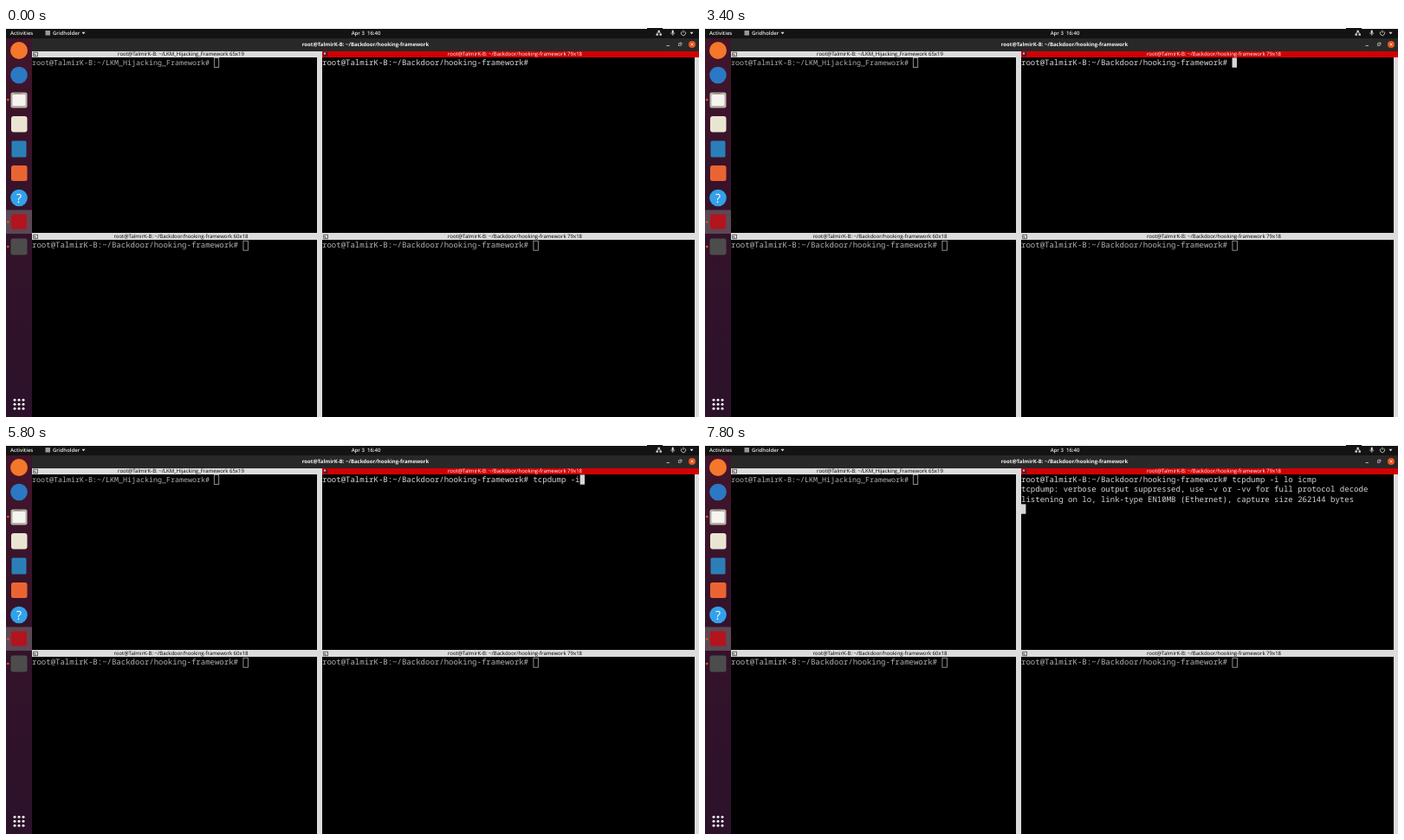
Write an HTML page with a canvas that moves like this. It is 800 px wide and 450 px high and loops after 8000 ms.

```html
<!DOCTYPE html>
<html lang="en">
<head>
<meta charset="utf-8">
<title>Split terminal</title>
<style>
  html, body { margin: 0; width: 100%; height: 100%; overflow: hidden; background: #000; }
  canvas { display: block; }
</style>
</head>
<body>
<canvas id="stage" width="800" height="450"></canvas>
<script>
const ctx = document.getElementById('stage').getContext('2d');
ctx.textRendering = 'geometricPrecision';

const LOOP = 8000;
const USER = 'root@TalmirK-B:';
const HOOK_DIR = '~/Backdoor/hooking-framework';
const LKM_DIR = '~/LKM_Hijacking_Framework';
const COMMAND = 'tcpdump -i lo icmp';
const OUTPUT = [
  'tcpdump: verbose output suppressed, use -v or -vv for full protocol decode',
  'listening on lo, link-type EN10MB (Ethernet), capture size 262144 bytes'
];
const ENTER_AT = 7800;
const BLINK = 600;
const TYPING_AT = 4000;
// [time in ms, characters typed so far]
const KEYS = [
  [4000, 2], [4200, 5], [4400, 6], [4600, 7], [4800, 8], [5200, 9], [5800, 10],
  [6000, 11], [6200, 12], [6400, 13], [6600, 14], [6800, 15], [7000, 16],
  [7200, 17], [7400, 18]
];

const BRIGHT = '#d6d6d6';
const DIM = '#b0b0b0';
const LIGHT = '#dcdcdc';
const UI = '"Open Sans", sans-serif';
const MONO = '"Noto Sans Mono", monospace';

function rect(x, y, w, h, color) {
  ctx.fillStyle = color;
  ctx.fillRect(x, y, w, h);
}

function disc(x, y, r, color) {
  ctx.fillStyle = color;
  ctx.beginPath();
  ctx.arc(x, y, r, 0, Math.PI * 2);
  ctx.fill();
}

function tile(x, y, w, h, r, color) {
  ctx.fillStyle = color;
  ctx.beginPath();
  ctx.roundRect(x, y, w, h, r);
  ctx.fill();
}

function line(points, color, width = 0.8) {
  ctx.strokeStyle = color;
  ctx.lineWidth = width;
  ctx.beginPath();
  points.forEach(([x, y]) => ctx.lineTo(x, y));
  ctx.stroke();
}

function frame(x, y, w, h, color, width = 0.8) {
  ctx.strokeStyle = color;
  ctx.lineWidth = width;
  ctx.strokeRect(x, y, w, h);
}

function text(str, x, y, font, color, align = 'left') {
  ctx.font = font;
  ctx.fillStyle = color;
  ctx.textAlign = align;
  ctx.fillText(str, x, y);
}

function arrow(x, y) {
  ctx.fillStyle = '#e6e6e6';
  ctx.beginPath();
  ctx.moveTo(x - 2, y - 1);
  ctx.lineTo(x + 2, y - 1);
  ctx.lineTo(x, y + 1.4);
  ctx.fill();
}

function drawTopBar() {
  rect(0, 0, 800, 12, '#131313');
  rect(0, 0, 740, 1, '#fff');
  rect(758, 0, 42, 1, '#fff');
  const font = `600 6px ${UI}`;
  text('Activities', 5, 7.9, font, '#ececec');
  rect(45.5, 3, 5.5, 5.5, '#9a9a9a');
  text('Gridholder', 54, 7.9, font, '#ececec');
  arrow(89.5, 5.8);
  text('Apr 3  16:40', 415.5, 7.9, font, '#ececec', 'center');

  // network, microphone and power indicators
  rect(752.5, 2.8, 2.4, 2, '#e6e6e6');
  rect(750.5, 6.6, 2.4, 2, '#e6e6e6');
  rect(754.5, 6.6, 2.4, 2, '#e6e6e6');
  line([[751.7, 6.6], [751.7, 5.6], [755.7, 5.6], [755.7, 6.6]], '#e6e6e6', 0.6);
  tile(768.7, 2.4, 2, 4, 1, '#e6e6e6');
  line([[767.6, 5.4], [768.2, 7], [771.2, 7], [771.8, 5.4]], '#e6e6e6', 0.6);
  line([[769.7, 7], [769.7, 8.8]], '#e6e6e6', 0.6);
  ctx.strokeStyle = '#e6e6e6';
  ctx.lineWidth = 0.8;
  ctx.beginPath();
  ctx.arc(782, 6, 2.6, -0.9, Math.PI + 0.9);
  ctx.stroke();
  line([[782, 2.6], [782, 5.6]], '#e6e6e6');
  arrow(791.5, 5.8);
}

function drawTitleBar() {
  rect(30, 12, 770, 15, '#292828');
  text(`${USER} ${HOOK_DIR}`, 415, 21.3, `bold 6.02px ${UI}`, '#f4f4f4', 'center');
  line([[762.5, 20.5], [766, 20.5]], '#d8d8d8');
  frame(776.4, 18, 2.6, 2.6, '#d8d8d8', 0.6);
  line([[777.4, 17], [780, 17], [780, 19.6]], '#d8d8d8', 0.6);
  disc(792, 19, 4, '#e95420');
  line([[790.6, 17.6], [793.4, 20.4]], '#fff', 0.7);
  line([[793.4, 17.6], [790.6, 20.4]], '#fff', 0.7);
}

function drawDock() {
  const fade = ctx.createLinearGradient(0, 12, 0, 450);
  fade.addColorStop(0, '#42152b');
  fade.addColorStop(0.45, '#34132a');
  fade.addColorStop(1, '#2b122a');
  rect(0, 12, 30, 438, fade);
  rect(0, 210.5, 30, 27.5, '#5d4755');

  disc(15, 26, 10, '#f4772b');
  disc(15, 54.5, 9.8, '#2b78c4');

  tile(5.5, 74.5, 19, 18, 2, '#b9b2a8');
  tile(7.5, 77, 15, 13, 1, '#f6f4f0');
  rect(10, 74.5, 8, 1.4, '#8d867d');

  tile(6, 102, 18.5, 18.5, 3, '#e9e5d2');
  tile(6.5, 130.5, 17, 19, 1.5, '#2b7fb8');
  tile(6, 159, 18.5, 18, 2.5, '#ea6433');

  disc(15, 196.5, 9.8, '#33a1ea');
  text('?', 15, 201.6, `14px ${UI}`, '#fff', 'center');

  tile(6, 215.5, 18, 17, 1.5, '#b3141d');
  tile(5.5, 243.5, 19, 19, 2.5, '#4c4c4c');

  for (const y of [83, 224.5, 253]) disc(2.3, y, 1.3, '#e95420');
  for (let i = 0; i < 9; i++) {
    disc(10 + (i % 3) * 5, 430.3 + Math.floor(i / 3) * 5, 1.5, '#f2f2f2');
  }
}

function drawPane({ x, y, w, h, dir, grid, active }) {
  rect(x, y, w, 7, active ? '#d10003' : LIGHT);
  text(`${USER} ${dir} ${grid}`, x + w / 2 + 5, y + 5.4, `6.02px ${UI}`,
    active ? '#fff' : '#000', 'center');
  if (active) {
    rect(x + 1.5, y + 1, 5, 5, '#5a1830');
    rect(x + 2, y + 1.5, 2, 2, '#c9c3d8');
  } else {
    frame(x + 1.8, y + 1.2, 4.6, 4.6, '#333', 0.7);
    line([[x + 1.8, y + 3.5], [x + 4, y + 3.5], [x + 4, y + 5.8]], '#333', 0.6);
  }
  rect(x, y + 7, w, h - 7, '#000');
  rect(x + w - 5, y + 7, 5, h - 7, LIGHT);
}

function drawPrompt(x, top, dir, size) {
  const prompt = `${USER}${dir}# `;
  text(prompt, x, top + 8.6, `${size}px ${MONO}`, DIM);
  frame(x + prompt.length * size * 0.6 + 0.4, top + 0.4, 5.4, 11, DIM, 0.8);
}

function typedCount(t) {
  let count = 0;
  for (const [time, chars] of KEYS) if (t >= time) count = chars;
  return count;
}

function drawActiveTerminal(t) {
  const size = 9.02, cell = size * 0.6, row = 11.33, x = 365, top = 34.4;
  const print = (str, r) => text(str, x, top + 8.6 + r * row, `${size}px ${MONO}`, BRIGHT);
  const prompt = `${USER}${HOOK_DIR}# ${COMMAND.slice(0, typedCount(t))}`;
  const done = t >= ENTER_AT;
  print(prompt, 0);
  if (done) OUTPUT.forEach((str, i) => print(str, i + 1));

  const cursorOn = t >= TYPING_AT || Math.floor(t / BLINK) % 2 === 1;
  if (!cursorOn) return;
  const column = done ? 0 : prompt.length;
  const cursorRow = done ? OUTPUT.length + 1 : 0;
  rect(x + column * cell, top + cursorRow * row, cell, row, BRIGHT);
}

function draw(t) {
  rect(0, 0, 800, 450, '#000');
  drawDock();
  drawTopBar();
  drawTitleBar();
  // sashes between the panes
  rect(30, 237, 770, 1, LIGHT);
  rect(364, 27, 1, 423, LIGHT);
  drawPane({ x: 30, y: 27, w: 334, h: 210, dir: LKM_DIR, grid: '65x19' });
  drawPane({ x: 365, y: 27, w: 435, h: 210, dir: HOOK_DIR, grid: '79x18', active: true });
  drawPane({ x: 30, y: 238, w: 334, h: 212, dir: HOOK_DIR, grid: '60x18' });
  drawPane({ x: 365, y: 238, w: 435, h: 212, dir: HOOK_DIR, grid: '79x18' });
  drawPrompt(30, 34, LKM_DIR, 8.33);
  drawPrompt(30, 245.8, HOOK_DIR, 9.02);
  drawPrompt(365, 245.8, HOOK_DIR, 9.02);
  drawActiveTerminal(t);
}

const start = performance.now();
function tick() {
  draw((performance.now() - start) % LOOP);
  requestAnimationFrame(tick);
}
tick();
</script>
</body>
</html>
```
